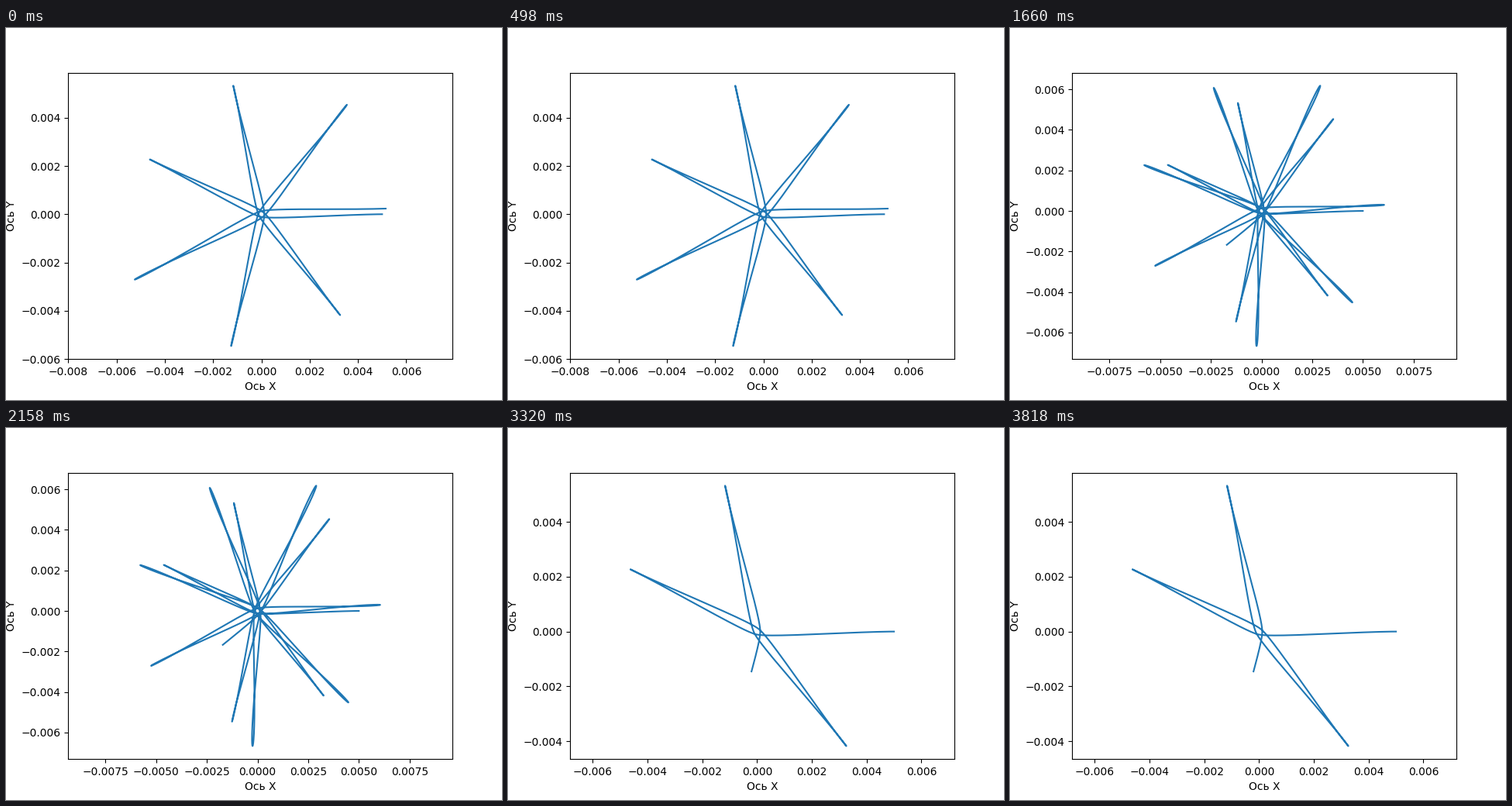
A matplotlib script for the animation above (4.15 s loop, 640 px wide and 480 px high).

```python
import numpy as np
import matplotlib.pyplot as plt
from matplotlib.animation import FuncAnimation

# Charge near an attracting wire in a uniform magnetic field.
# Explicit Euler steps; lengths in units of the starting radius.
RADIUS = 0.005
SPIN = 0.0597          # half of the cyclotron frequency
START_VEL = 0.0005j
PARTS = 5              # path sections, one more shown per picture
STEPS = 19600          # steps in a section
DT = 9.407 / STEPS


def orbit(count):
    pos, vel = 1 + 0j, START_VEL
    points = np.empty(count, complex)
    for i in range(count):
        points[i] = pos
        r2 = pos.real ** 2 + pos.imag ** 2
        acc = -pos / r2 + 2j * SPIN * vel
        pos, vel = pos + vel * DT, vel + acc * DT
    return RADIUS * points


path = orbit(PARTS * STEPS)
fig, ax = plt.subplots(figsize=(6.4, 4.8), dpi=100)


def draw(i):
    # The loop opens on two sections and wraps round to one.
    shown = path[:((i + 1) % PARTS + 1) * STEPS]
    ax.clear()
    ax.plot(shown.real, shown.imag)
    ax.axis("equal")
    ax.set_xlabel("Ось X")
    ax.set_ylabel("Ось Y")


anim = FuncAnimation(fig, draw, frames=PARTS, interval=830, repeat=True)
plt.show()
```
